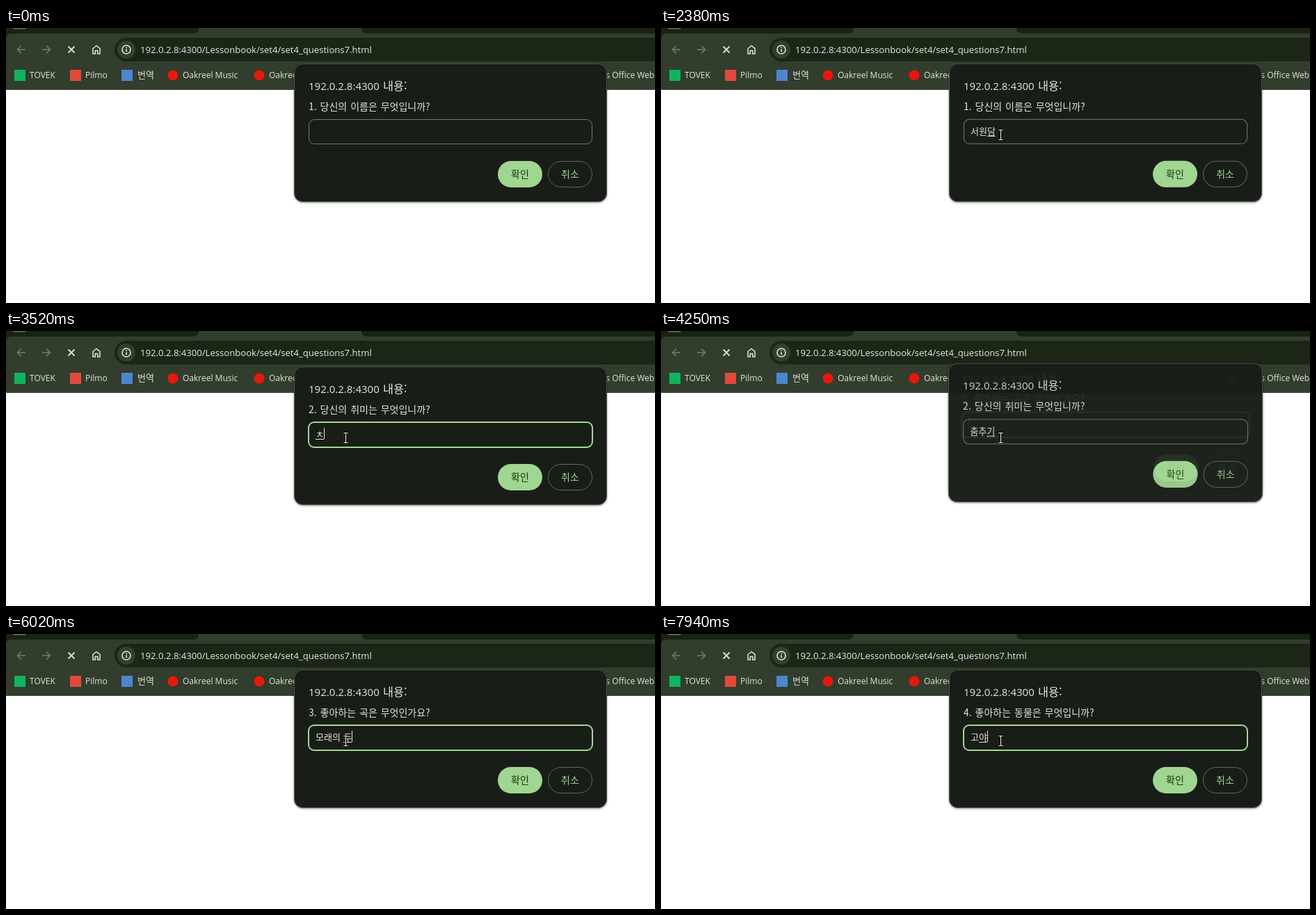
An HTML page that plays this animation: 933 by 395 pixels, repeating every 8 s.

```html
<!DOCTYPE html>
<html lang="ko">
<head>
<meta charset="utf-8">
<title>Prompt dialogs</title>
<style>
  html, body { margin: 0; width: 100%; height: 100%; overflow: hidden; background: #fff; }
  svg { display: block; width: 933px; height: 395px; }
  text { font-family: "Noto Sans CJK KR", "Noto Sans KR", sans-serif; white-space: pre; }
  .latin { font-family: "Open Sans", "Noto Sans", sans-serif; }
  .mark { fill: #dfe5d8; font-size: 12px; }
  .mark.ko { font-size: 13px; }
  .line { fill: none; stroke-width: 1.6; }
  .dialog text { fill: #e5e6df; }
  .dialog .panel { fill: #191d18; stroke: #50574c; filter: drop-shadow(0 1px 1.5px rgba(0, 0, 0, .45)); }
  .dialog .msg { font-size: 14px; word-spacing: 1px; }
  .dialog .btn { font-size: 14px; text-anchor: middle; }
  .dialog .value { font-size: 13.04px; word-spacing: 1px; }
</style>
</head>
<body>
<svg id="stage" viewBox="0 0 933 395">
  <rect width="933" height="395" fill="#fff"/>
  <rect width="933" height="20" fill="#182312"/>
  <path d="M0 89V16Q0 8 8 8H268Q277 8 277 0H511Q511 8 520 8H933V89Z" fill="#323d2d"/>
  <rect y="88" width="933" height="1" fill="#465141"/>
  <rect x="10" y="-3" width="19" height="4.5" rx="2" fill="#6b7465"/>
  <rect x="156" y="14" width="800" height="34" rx="17" fill="#1b2616"/>

  <g class="line" stroke="#747d6e">
    <path d="M28 31H17M22 25.5L16.5 31L22 36.5"/>
    <path d="M52 31H63M58 25.5L63.5 31L58 36.5"/>
  </g>
  <g class="line" stroke="#d6e2cb">
    <path d="M89.5 26.5L98.5 35.5M98.5 26.5L89.5 35.5" stroke-width="1.9"/>
    <path d="M125 29.5L130 25.5L135 29.5V37H131.7V32.5H128.3V37H125Z"/>
  </g>
  <circle cx="173" cy="31" r="13" fill="#343f2f"/>
  <g class="line" stroke="#dfe8d6">
    <circle cx="173" cy="31" r="6"/>
    <path d="M173 30.2V34.2M173 27.5V29"/>
  </g>
  <text class="latin" x="193" y="36" font-size="13.1" fill="#e6ebe0">192.0.2.8:4300/Lessonbook/set4/set4_questions7.html</text>

  <g id="marks"></g>
  <g id="dialogs"></g>
  <g id="arrow"><path d="M0 0V16L3.7 12.6L6.2 18L8.6 17L6.2 11.7H11.3Z" fill="#fff" stroke="#000"/></g>
  <g id="beam" fill="none">
    <path d="M-3 -7H3M0 -7V7M-3 7H3" stroke="#000" stroke-width="2.6"/>
    <path d="M-3 -7H3M0 -7V7M-3 7H3" stroke="#f4f4f4" stroke-width="1.1"/>
  </g>
</svg>
<script>
const LOOP = 8000;
const BLINK = 500;
const $ = id => document.getElementById(id);

// Bookmarks: icon shape, icon centre, icon colour, text x, label
const marks = [
  ["square", 20, "#10b45c", 34, "TOVEK"],
  ["square", 100, "#df4a3d", 114, "Pilmo"],
  ["square", 174, "#4d86cf", 189, "번역"],
  ["circle", 240, "#e8170d", 254, "Oakreel Music"],
  ["circle", 364, "#e8170d", 378, "Oakreel"],
  ["square", 453, "#c11119", 466, "노을극장 대한민국..."],
  ["circle", 606, "#2459b8", 617, "모루나+ | 영화 및..."],
  ["circle", 750, "#6c7467", 765, "asmr"],
  ["circle", 820, "#c9d1c2", 836, "Tavris Office Web"]
];
$("marks").innerHTML = marks.map(([shape, cx, fill, x, label]) => {
  const icon = shape === "circle"
    ? `<circle cx="${cx}" cy="68" r="7.5" fill="${fill}"/>`
    : `<rect x="${cx - 8}" y="60" width="16" height="16" fill="${fill}"/>`;
  const kind = /[가-힣]/.test(label) ? "ko" : "latin";
  return `${icon}<text class="mark ${kind}" x="${x}" y="72">${label}</text>`;
}).join("");

// Cross-fades between neighbouring dialogs
const fades = [[2380, 2540], [4220, 4390], [6650, 6820]];

// caretAt: first caret time; blurAt: focus lost; keys: input value from each time on
const prompts = [
  { q: "1. 당신의 이름은 무엇입니까?", caretAt: 560, blurAt: 2380, keys: [
    [1190, "ㅅ"], [1290, "서"], [1380, "성"], [1580, "서우"], [1665, "서워"], [1750, "서원"],
    [1910, "서원ㄷ"], [1995, "서원다"], [2080, "서원담"]] },
  { q: "2. 당신의 취미는 무엇입니까?", caretAt: 2380, blurAt: 4220, keys: [
    [3420, ""], [3500, "ㅊ"], [3580, "추"], [3660, "춤"], [3740, "춤ㅊ"], [3820, "춤추"],
    [3990, "춤축"], [4020, "춤추기"]] },
  { q: "3. 좋아하는 곡은 무엇인가요?", caretAt: 4250, blurAt: 6530, keys: [
    [5290, "ㅁ"], [5450, "모"], [5490, "몰"], [5540, "모래"], [5710, "모랭"], [5780, "모래의"],
    [5850, "모래의 "], [5940, "모래의 ㄷ"], [6020, "모래의 두"], [6110, "모래의 둘"],
    [6200, "모래의 두레"], [6290, "모래의 두렙"], [6380, "모래의 두레바"], [6460, "모래의 두레박"]] },
  { q: "4. 좋아하는 동물은 무엇입니까?", caretAt: 6670, blurAt: LOOP, keys: [
    [7700, "ㄱ"], [7735, "고"], [7770, "공"], [7940, "고야"]] }
];

$("dialogs").innerHTML = prompts.map(p => `
  <g class="dialog">
    <rect class="panel" x="414.5" y="51.5" width="449" height="198" rx="12"/>
    <text class="latin" x="435" y="89" font-size="15">192.0.2.8:4300</text>
    <text x="542" y="89" font-size="16.3">내용:</text>
    <text class="msg" x="435" y="118">${p.q}</text>
    <rect class="idle" x="435.5" y="131.5" width="407" height="35" rx="8" fill="none" stroke="#737b6e"/>
    <rect class="ring" x="435" y="131" width="408" height="36" rx="8" fill="none" stroke="#a3d795" stroke-width="2"/>
    <text class="value" x="445" y="153"></text>
    <rect class="under" y="155" width="12" height="1" fill="#e3e4dc"/>
    <rect class="caret" y="139" width="1" height="16" fill="#e3e4dc"/>
    <rect x="707" y="191" width="64" height="38" rx="19" fill="#a0d691"/>
    <text class="btn" x="739" y="215" style="fill:#16380f">확인</text>
    <rect x="779.5" y="191.5" width="63" height="37" rx="18.5" fill="none" stroke="#5f675a"/>
    <text class="btn" x="811" y="215" style="fill:#a0d691">취소</text>
  </g>`).join("");

[...$("dialogs").children].forEach((el, i) => {
  const p = prompts[i];
  p.el = el;
  for (const name of ["idle", "ring", "value", "under", "caret"]) p[name] = el.querySelector("." + name);
});

const clamp = v => Math.min(1, Math.max(0, v));
const smooth = (a, b, v) => { const x = clamp((v - a) / (b - a)); return x * x * (3 - 2 * x); };
const progress = (fade, t) => clamp((t - fade[0]) / (fade[1] - fade[0]));
const show = (el, on) => el.style.display = on ? "" : "none";
const textWidth = s => [...s].reduce((w, c) => w + (c === " " ? 4 : 12), 0);

function drawPrompt(p, i, t) {
  const enter = i ? progress(fades[i - 1], t) : 1;
  const leave = i < fades.length ? progress(fades[i], t) : 0;
  const alpha = smooth(.1, .6, enter) * (1 - smooth(.14, .58, leave));
  show(p.el, alpha > 0);
  if (!alpha) return;

  // A raised dialog sits higher and slightly larger
  const lift = leave ? Math.min(1, 1.35 * leave) : Math.pow(1 - enter, 1.2);
  p.el.setAttribute("opacity", alpha);
  p.el.setAttribute("transform", lift
    ? `translate(639 ${150.5 - 18 * lift}) scale(${1 + .018 * lift}) translate(-639 -150.5)` : "");

  const typed = p.keys.filter(k => k[0] <= t);
  const [since, value] = typed.length ? typed[typed.length - 1] : [p.caretAt, ""];
  const end = 445 + textWidth(value);
  const focused = t >= p.caretAt && t < p.blurAt;

  if (p.value.textContent !== value) p.value.textContent = value;
  show(p.idle, !focused);
  show(p.ring, focused);
  show(p.under, value && !value.endsWith(" "));
  p.under.setAttribute("x", end - 12);
  show(p.caret, focused && Math.floor((t - since) / BLINK) % 2 === 0);
  p.caret.setAttribute("x", end);
}

// Pointer path: time, x, y
const path = [[30, 395, 308], [200, 420, 200], [340, 455, 106], [480, 480, 140], [560, 486, 150], [800, 488.5, 153.5]];

function drawPointer(t) {
  const next = path.findIndex(k => k[0] > t);
  let [, x, y] = path[path.length - 1];
  if (next > 0) {
    const [a, b] = [path[next - 1], path[next]];
    const f = (t - a[0]) / (b[0] - a[0]);
    x = a[1] + (b[1] - a[1]) * f;
    y = a[2] + (b[2] - a[2]) * f;
  }
  const overInput = x > 435 && y > 131 && y < 167;
  show($("beam"), next !== 0 && overInput);
  show($("arrow"), next !== 0 && !overInput);
  for (const id of ["beam", "arrow"]) $(id).setAttribute("transform", `translate(${x} ${y})`);
}

const start = performance.now();
function draw() {
  const t = (performance.now() - start) % LOOP;
  prompts.forEach((p, i) => drawPrompt(p, i, t));
  drawPointer(t);
  requestAnimationFrame(draw);
}
draw();
</script>
</body>
</html>
```
